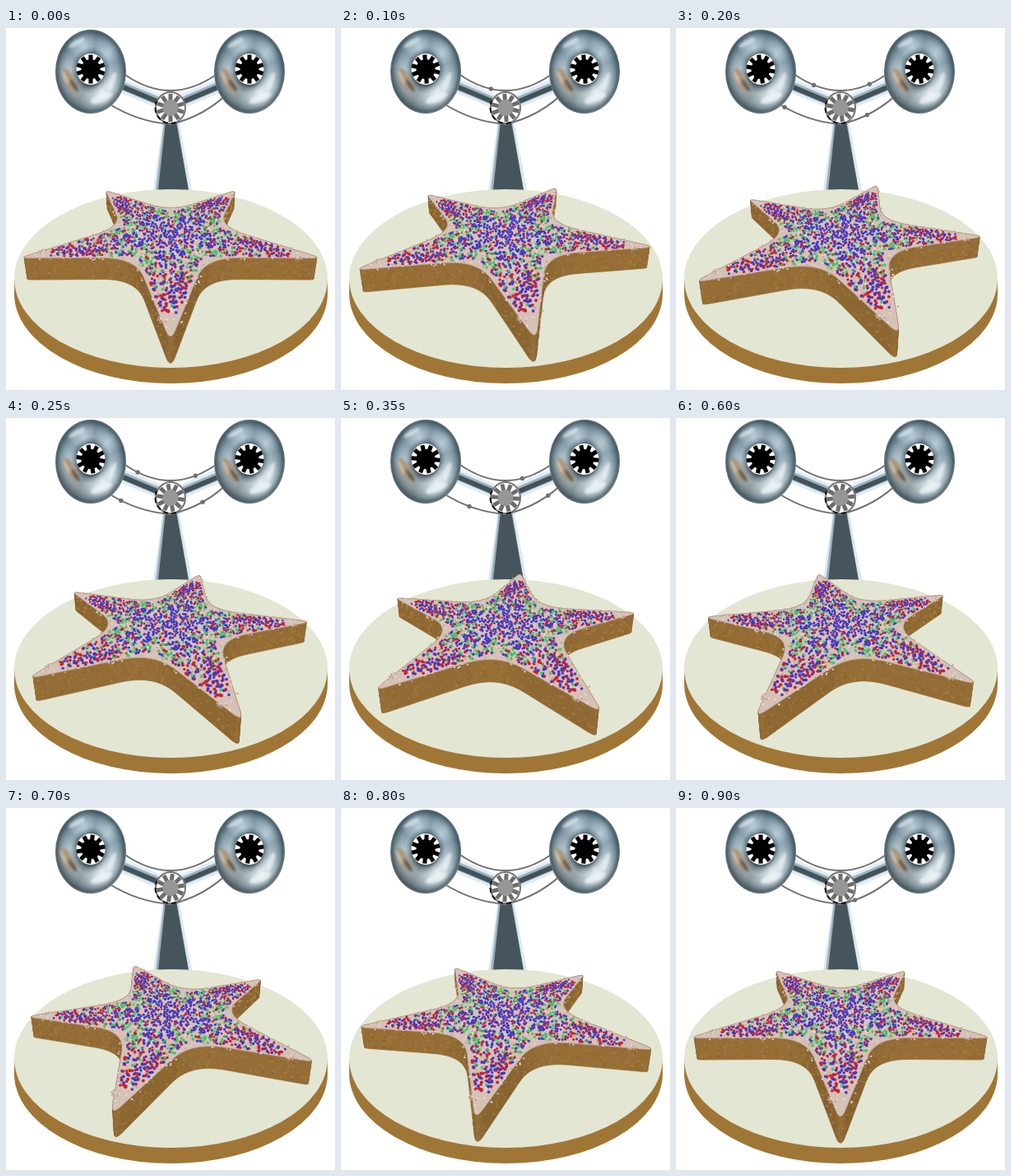
An HTML page with a canvas that plays this animation: 400 by 440 pixels, repeating every 950 ms.

```html
<!DOCTYPE html>
<html>
<head>
<meta charset="utf-8">
<style>
html, body { margin: 0; width: 100%; height: 100%; overflow: hidden; background: #fff; }
canvas { display: block; }
</style>
</head>
<body>
<canvas id="stage" width="400" height="440"></canvas>
<script>
const ctx = document.getElementById('stage').getContext('2d');
const TAU = Math.PI * 2, STEP = 50, STEPS = 19;

let seed = 7;
const rand = () => (seed = (seed * 16807) % 2147483647) / 2147483647;

function polygon(points, fill, outline) {
  ctx.beginPath();
  points.forEach(([x, y]) => ctx.lineTo(x, y));
  ctx.closePath();
  ctx.fillStyle = fill;
  ctx.fill();
  if (!outline) return;
  ctx.lineWidth = 0.7;
  ctx.strokeStyle = outline;
  ctx.stroke();
}

function ellipse(x, y, rx, ry, fill, tilt = 0) {
  ctx.beginPath();
  ctx.ellipse(x, y, rx, ry, tilt, 0, TAU);
  ctx.fillStyle = fill;
  ctx.fill();
}

function line(x1, y1, x2, y2, width, color) {
  ctx.beginPath();
  ctx.moveTo(x1, y1);
  ctx.lineTo(x2, y2);
  ctx.lineWidth = width;
  ctx.strokeStyle = color;
  ctx.stroke();
}

// Perspective view of a point on the star; depth 0 is the top face, 1 the bottom.
function project([side, front], depth = 0) {
  const w = 1 - 0.343 * front + 0.02 * depth;
  return [200 + 167.4 * side / w, 12.4 + (238.2 + 29.2 * depth) / w, 1 / w];
}

const polar = (r, a) => [r * Math.sin(a), r * Math.cos(a)];
const mix = (p, q, k) => [p[0] + (q[0] - p[0]) * k, p[1] + (q[1] - p[1]) * k];
const quad = (a, b, c, u) => mix(mix(a, b, u), mix(b, c, u), u);
const turn = ([x, y], a) => [x * Math.cos(a) + y * Math.sin(a), y * Math.cos(a) - x * Math.sin(a)];

// Five-pointed outline with rounded corners.
const outline = [];
for (let i = 0; i < 5; i++) {
  const at = k => polar(k % 2 ? 0.385 : 1.035, k * TAU / 10);
  for (const [k, cut, n] of [[2 * i, 0.1, 8], [2 * i + 1, 0.3, 10]]) {
    const a = mix(at(k), at(k + 9), cut), b = mix(at(k), at(k + 1), cut);
    for (let j = 0; j <= n; j++) outline.push(quad(a, at(k), b, j / n));
  }
}
const perArm = outline.length / 5;

// Crust speckles per wall, the same on every arm.
const grain = Array.from({ length: perArm }, (_, i) => {
  const [a, b] = [outline[i], outline[i + 1]];
  const count = Math.round(90 * Math.hypot(a[0] - b[0], a[1] - b[1]));
  return Array.from({ length: count }, () =>
    ({ at: rand(), depth: 0.05 + rand() * 0.9, color: rand() < 0.5 ? '#7e551f40' : '#bd904d50' }));
});

// A scatter over one arm, repeated around the star.
function scatter(count, reach, slope, make) {
  const dots = [];
  while (dots.length < count) {
    const along = rand() * reach, across = (rand() - 0.5) * 0.5;
    const limit = Math.min(along * 0.7265, (reach + 0.12 - along) * slope);
    if (Math.abs(across) < limit) dots.push(make(along, across, Math.abs(across) / limit));
  }
  return dots;
}

const sprinkles = scatter(350, 0.84, 0.32, (along, across, edge) => {
  const pick = rand();
  const green = along > 0.2 && along < 0.55 && edge > 0.5 ? 0.5 : 0.08;
  const red = along > 0.45 ? 0.45 : 0.25;
  const color = pick < green ? '#42c56a' : pick < green + red ? '#c42238' : '#4038c8';
  return { p: [across, along], color, r: 1.25 + rand() * 0.35 };
});
const crumbs = scatter(200, 0.95, 0.34, (along, across) =>
  ({ p: [across, along], color: rand() < 0.5 ? '#c3a393' : '#e6d8d0', r: 0.9 }));

function drawStar(angle) {
  const rim = outline.map(p => turn(p, angle));
  const walls = rim.map((a, i) => {
    const b = rim[(i + 1) % rim.length];
    const facing = (b[0] - a[0]) / Math.hypot(b[0] - a[0], b[1] - a[1]);
    return { a, b, facing, z: a[1] + b[1], grain: grain[i % perArm] };
  });
  walls.sort((m, n) => m.z - n.z);
  for (const { a, b, facing, grain } of walls) {
    const fill = `hsl(35 47% ${34 + 6 * Math.abs(facing)}%)`;
    polygon([project(a), project(b), project(b, 1), project(a, 1)], fill, fill);
    for (const { at, depth, color } of grain) {
      const [x, y] = project(mix(a, b, at), depth);
      ellipse(x, y, 1.5, 1.5, color);
    }
  }
  polygon(rim.map(p => project(p)), '#d6c1b6', '#b69b8c');
  for (const group of [crumbs, sprinkles])
    for (let arm = 0; arm < 5; arm++)
      for (const { p, color, r } of group) {
        const [x, y, scale] = project(turn(p, angle + arm * TAU / 5));
        ellipse(x, y, r * scale, r * scale, color);
      }
}

function drawGear(x, y, r, teeth, angle, color) {
  for (let i = 0; i < teeth; i++) {
    const [dx, dy] = polar(r, angle + i * TAU / teeth);
    line(x + dx * 0.5, y + dy * 0.5, x + dx, y + dy, r * 0.29, color);
  }
}

function shaded(gradient, stops) {
  stops.forEach(([at, color]) => gradient.addColorStop(at, color));
  return gradient;
}

function drawRing(x, y, phase) {
  const sway = Math.sin(phase * TAU) * 2;
  ctx.save();
  ctx.translate(x, y);
  ctx.scale(43, 51);
  ellipse(0, 0, 1, 1, shaded(ctx.createConicGradient(0, 0, 0), [
    [0, '#8fa6b3'], [0.08, '#c5d5dc'], [0.16, '#e2eaed'], [0.23, '#b4c4cb'], [0.32, '#7d8b8d'],
    [0.42, '#8c979a'], [0.52, '#9cb2bd'], [0.6, '#6f8896'], [0.7, '#a9c0cc'],
    [0.78, '#6d8797'], [0.88, '#a5bdc9'], [0.95, '#7690a0'], [1, '#8fa6b3']]));
  ellipse(0, 0, 1, 1, shaded(ctx.createRadialGradient(0, -0.04, 0.38, 0, 0, 1), [
    [0, '#33434bcc'], [0.12, '#5d717a66'], [0.32, '#eaf2f544'], [0.5, '#dce8ee33'],
    [0.75, '#4a606c55'], [0.92, '#33454ebb'], [1, '#5c6b70cc']]));
  ctx.restore();

  ctx.save();
  ctx.filter = 'blur(1.5px)';
  ellipse(x - 26 + sway, y + 10, 6, 16, '#a8977f', -0.5);
  ellipse(x - 20 + sway, y + 17, 2, 9, '#5b5548', -0.6);
  ellipse(x - 31 + sway, y + 7, 1.5, 9, '#d3c8b6', -0.4);
  ellipse(x - 17, y - 35, 11, 3, '#dce9f0bb', -0.5);
  ellipse(x + 13, y + 32, 14, 5, '#edf4f6cc', -0.4);
  ellipse(x + 26, y + 12, 3, 12, '#f0f6f8aa', 0.35);
  ctx.restore();

  ellipse(x, y - 3, 17.5, 19, '#fff');
  ellipse(x, y - 3, 11.5, 12, '#000');
  drawGear(x, y - 3, 17.5, 10, phase * TAU / 10, '#000');
}

const upper = [[145, 57], [200, 95], [255, 57]];
const lowerLeft = [[125, 92], [160, 114], [200, 117]];
const lowerRight = [[200, 117], [243, 107], [273, 76]];
const belts = [upper, lowerLeft, lowerRight];
// Beads: belt, position at start, rate per ms, start and end of visibility.
const beads = [
  [upper, 0.34, -0.00135, 100, 350],
  [upper, 0.82, -0.0009, 200, 450],
  [lowerLeft, 0.1, 0.0022, 200, 450],
  [lowerRight, 0.4, 0.0018, 200, 450],
  [lowerRight, 0.21, 0.0018, 900, 950]
];

function drawStand(time) {
  const phase = time / (STEP * (STEPS - 1));
  for (const side of [-1, 1]) {
    const inner = 200 + side * 12, outer = 200 + side * 62;
    line(outer, 69, inner, 90, 17, '#e0ecf5');
    line(outer, 69, inner, 90, 10, '#9cb2be');
    line(outer, 70, inner, 91, 6, '#435158');
  }
  polygon([[191, 112], [210, 112], [226, 197], [179, 197]], '#dce9f3');
  polygon([[192, 114], [208, 114], [222, 197], [182, 197]], '#9bb1bd');
  polygon([[194, 114], [207, 114], [222, 197], [185, 197]], '#46555b');

  for (const [a, b, c] of belts) {
    ctx.beginPath();
    ctx.moveTo(...a);
    ctx.quadraticCurveTo(...b, ...c);
    ctx.lineWidth = 2;
    ctx.strokeStyle = '#707070';
    ctx.stroke();
  }
  ellipse(200, 97, 18, 19, '#fff');
  drawGear(200, 97, 17, 10, phase * TAU / 10, '#6c6c6c');
  ctx.beginPath();
  ctx.ellipse(200, 97, 18, 19, 0, 0, TAU);
  ctx.lineWidth = 2;
  ctx.strokeStyle = '#747474';
  ctx.stroke();
  ctx.beginPath();
  ctx.ellipse(200, 97, 18.5, 19, 0, 1.2, 3.6);
  ctx.setLineDash([6, 4]);
  ctx.strokeStyle = '#111';
  ctx.stroke();
  ctx.setLineDash([]);
  ellipse(200, 97, 9.5, 10, '#969696');

  for (const [belt, start, rate, from, to] of beads)
    if (time >= from && time < to) {
      const [x, y] = quad(...belt, start + rate * (time - from));
      ellipse(x, y, 2.7, 2.7, '#707070');
    }
  drawRing(103, 53, phase);
  drawRing(296, 53, phase);
}

function drawBoard() {
  ellipse(200.5, 323, 190.5, 109, '#a07636');
  ctx.fillRect(10, 304, 381, 19);
  ellipse(200.5, 304.5, 190.5, 108.5, '#e3e6d3');
}

function draw(now) {
  const step = Math.floor(now / STEP) % STEPS;
  ctx.fillStyle = '#fff';
  ctx.fillRect(0, 0, 400, 440);
  drawStand(step * STEP);
  drawBoard();
  drawStar(step * TAU / 90);
  requestAnimationFrame(draw);
}
requestAnimationFrame(draw);
</script>
</body>
</html>
```
